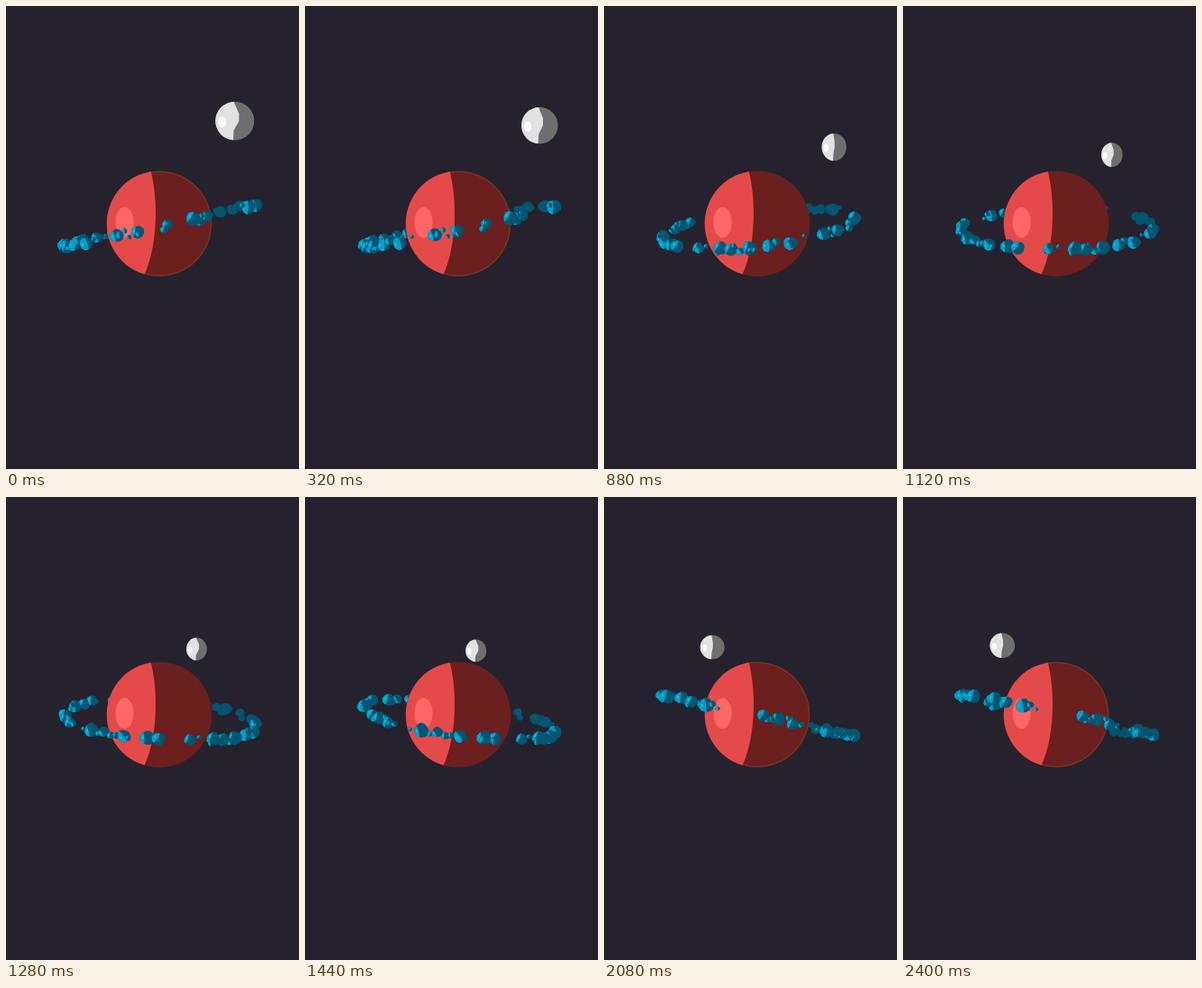
An HTML page with a canvas that plays this animation: 325x512 px, repeating every 2440 ms.

```html
<!DOCTYPE html>
<html lang="en">
<head>
<meta charset="utf-8">
<title>Ringed planet</title>
<style>
html, body { margin: 0; width: 100%; height: 100%; overflow: hidden; background: #25222e; }
canvas { display: block; width: 325px; height: 512px; }
</style>
</head>
<body>
<canvas id="stage" width="325" height="512"></canvas>
<script>
const ctx = document.getElementById('stage').getContext('2d');
const LOOP = 2440, STEP = 40, TAU = Math.PI * 2, RAD = Math.PI / 180;
const PLANET = { x: 170, y: 240.7, r: 58.3 };
const RING = { r: 106, depth: .13, tilt: .215, drift: .009 }; // drift in degrees per ms
const HALF_TURN = 184;

let seed = 11;
function random() {
  seed = (seed * 16807) % 2147483647;
  return seed / 2147483647;
}
const spread = n => (random() * 2 - 1) * n;

function makeRock(a, r, dy) {
  return { a, r, dy, edge: spread(.35) - .22, turn: spread(.6), squash: .88 + random() * .15, cut: random() * TAU };
}

// Angles of the big rocks around the ring in degrees; 0 faces the viewer.
const bigRocks = [
  92, 82, 72, 60, 26, 18, 4, -12, -24, -45, -57, -67, -77, -83, -97, -114,
  -120, -133, -145, -154, -176, -184, -192, -224, -234, -242, -260
];
const rocks = bigRocks.flatMap(a => [
  makeRock(a, 5.4 + random() * 2, spread(1.5)),
  makeRock(a + spread(5), 3 + random() * 1.5, spread(4)),
  makeRock(a + spread(8), 1.5 + random() * 1.5, spread(4.5))
]);

const ease = t => (1 - Math.cos(Math.PI * Math.min(t / 2400, 1))) / 2;

function oval(x, y, rx, ry, color) {
  ctx.fillStyle = color;
  ctx.beginPath();
  ctx.ellipse(x, y, rx, ry, 0, 0, TAU);
  ctx.fill();
}

// The moon circles the planet, seen in perspective.
function drawMoon(turn) {
  const a = (44 + turn * .967) * RAD;
  const far = 1.195 - .436 * Math.cos(a + 10 * RAD);
  const x = 165 + 120 * Math.sin(a) / far;
  const y = 241 + (6 * Math.cos(a + 20 * RAD) - 109.5) / far;
  const ry = 20 / far;
  const rx = ry * (.95 + .07 * Math.cos(2 * a - 60 * RAD));
  const bulge = .14 + .1 * Math.sin(3 * a);

  oval(x, y, rx, ry, '#6e6f6e');
  ctx.save();
  ctx.clip();
  ctx.translate(x, y);
  ctx.scale(rx, ry);
  ctx.fillStyle = '#e2e2e2';
  ctx.beginPath();
  ctx.moveTo(-1.1, -1.1);
  ctx.lineTo(-.08, -1.05);
  ctx.lineTo(bulge, -.4);
  ctx.lineTo(bulge, 0);
  ctx.lineTo(-.06, .5);
  ctx.lineTo(-.08, 1.05);
  ctx.lineTo(-1.1, 1.1);
  ctx.fill();
  oval(-.65, .06, .2, .29, '#fbfbfb');
  ctx.restore();
}

function drawPlanet(glow) {
  const { x, y, r } = PLANET;
  oval(x, y, r, r, '#6b1f1f');
  ctx.save();
  ctx.clip();
  ctx.strokeStyle = `rgba(125, 75, 35, ${glow})`;
  ctx.lineWidth = 3;
  ctx.beginPath();
  ctx.arc(x, y, r, -1.75, 1.85);
  ctx.stroke();
  ctx.fillStyle = '#e54a4a';
  ctx.beginPath();
  ctx.moveTo(100, 180);
  ctx.lineTo(160, 180);
  ctx.bezierCurveTo(169, 213, 169, 266, 152, 300);
  ctx.lineTo(100, 300);
  ctx.fill();
  ctx.restore();
  oval(131.5, 239.3, 10, 17, '#ff6767');
}

function drawRock({ rock, x, y, scale, shaded }) {
  const r = rock.r * scale;
  ctx.save();
  ctx.translate(x, y);
  ctx.beginPath();
  for (let i = 0; i < 11; i++) {
    const a = i / 11 * TAU, d = r * (1 + .07 * Math.sin(a * 3 + rock.cut));
    ctx.lineTo(Math.cos(a) * d, Math.sin(a) * d * rock.squash);
  }
  ctx.fillStyle = '#00556f';
  ctx.fill();
  if (!shaded) {
    ctx.clip();
    ctx.rotate(rock.turn);
    const edge = r * rock.edge;
    ctx.fillStyle = '#009fca';
    ctx.beginPath();
    ctx.moveTo(-r * 1.3, -r * 1.3);
    ctx.lineTo(edge - r * .1, -r * 1.3);
    ctx.quadraticCurveTo(edge + r * .3, 0, edge - r * .1, r * 1.3);
    ctx.lineTo(-r * 1.3, r * 1.3);
    ctx.fill();
    oval(-r * .6, -r * .05, r * .14, r * .25, '#18b9e5');
  }
  ctx.restore();
}

// The tilted ring turns as a whole, so its slope and opening trade places.
function placeRocks(t, turn) {
  const phase = (5.4 + turn) * RAD;
  const slope = -RING.tilt * Math.cos(phase), open = RING.tilt * Math.sin(phase);
  return rocks.map(rock => {
    const a = (rock.a + turn + RING.drift * t) * RAD;
    const z = Math.cos(a), scale = 1 + RING.depth * z;
    const flat = RING.r * Math.sin(a);
    return {
      rock, z, scale,
      x: 171 + flat * scale,
      y: 242 + 2 * Math.sin(phase) + (slope * flat + open * RING.r * z) * scale + rock.dy,
      shaded: z < 0 && flat > 0
    };
  }).sort((p, q) => p.z - q.z);
}

function draw(t) {
  const turn = HALF_TURN * ease(t);
  const placed = placeRocks(t, turn);
  ctx.fillStyle = '#25222e';
  ctx.fillRect(0, 0, 325, 512);
  drawMoon(turn);
  placed.filter(p => p.z < 0).forEach(drawRock);
  drawPlanet(.5 * Math.cos(turn * RAD) ** 4);
  placed.filter(p => p.z >= 0).forEach(drawRock);
}

const start = performance.now();
function tick() {
  const t = (performance.now() - start) % LOOP;
  draw(Math.floor(t / STEP) * STEP);
  requestAnimationFrame(tick);
}
tick();
</script>
</body>
</html>
```
